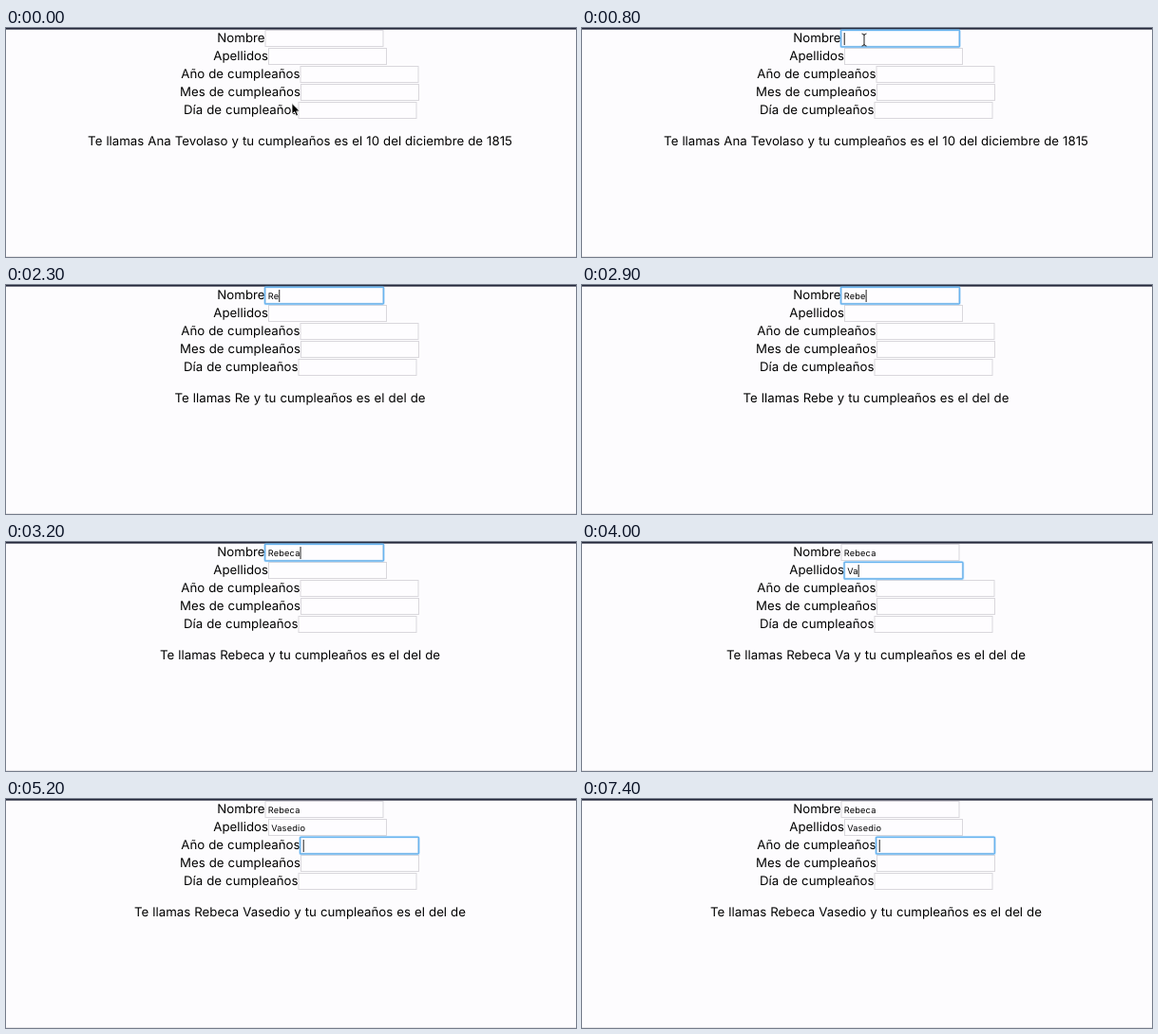
Animation of 600x242 px, one loop 8000 ms. Source, as an HTML page:

```html
<!DOCTYPE html>
<html lang="es">
<head>
<meta charset="utf-8">
<style>
  html, body { margin: 0; width: 100%; height: 100%; overflow: hidden; background: #fdfcfe; }
  svg { display: block; }
  text { font: 13.25px Inter, sans-serif; word-spacing: .3px; fill: #000; text-rendering: geometricPrecision; white-space: pre; }
  .label { text-anchor: end; }
  .value { font-size: 9.2px; letter-spacing: .2px; }
  .box { fill: #fefdff; stroke: #d9d7dc; }
  #ring rect { fill: none; stroke: #69b5f0; }
</style>
</head>
<body>
<svg width="600" height="242" viewBox="0 0 600 242">
  <rect width="600" height="1.6" fill="#23273a"/>
  <rect y="241" width="600" height="1" fill="#e6e5e8"/>
  <g id="form"></g>
  <g id="ring">
    <rect x="-.5" y="-.2" width="125" height="17.7" rx="1" stroke-width="3" stroke-opacity=".2"/>
    <rect x="-.5" y="-.2" width="125" height="17.7" rx="1" stroke-width="1.4"/>
  </g>
  <rect id="caret" width="1" height="13" fill="#222"/>
  <text id="sentence" x="309.5" y="124" text-anchor="middle"></text>
  <path id="arrow" d="M0 0V11.6L2.7 9.1L4.5 13.4L6.5 12.5L4.7 8.4H8.2Z" fill="#000" stroke="#fff" stroke-width=".8"/>
  <path id="beam" d="M-2.5 -6.5Q0 -6.5 0 -4.5Q0 -6.5 2.5 -6.5M0 -4.5V4.5M-2.5 6.5Q0 6.5 0 4.5Q0 6.5 2.5 6.5" fill="none" stroke="#222"/>
</svg>
<script>
const LOOP = 8000;
const $ = id => document.getElementById(id);

const fields = [
  ['Nombre', 272.5], ['Apellidos', 276], ['Año de cumpleaños', 309.5],
  ['Mes de cumpleaños', 310], ['Día de cumpleaños', 307.5]
].map(([label, x], i) => ({ label, x: x + .5, y: 2.5 + 19 * i }));

$('form').innerHTML = fields.map(({ label, x, y }) => `
  <text class="label" x="${x - .5}" y="${y + 12.5}">${label}</text>
  <rect class="box" x="${x}" y="${y}" width="124" height="17"/>
  <text class="value" x="${x + 2.7}" y="${y + 12.7}"></text>`).join('');
const values = document.querySelectorAll('.value');

const typed = [
  { text: 'Rebeca', keys: [2100, 2300, 2500, 2700, 3000, 3200] },
  { text: 'Vasedio', keys: [3800, 4000, 4200, 4400, 4600, 5200, 5200] }
];
const focusTimes = [800, 3400, 5200];
const caretOff = [[1400, 1900], [5700, 6300], [6900, 7400]];
const pointer = [
  [0, 'arrow', 301, 79.5], [100, 'arrow', 300, 56], [200, 'beam', 299, 35],
  [300, 'beam', 300, 24.5], [500, 'beam', 298, 18], [600, 'beam', 297, 12.5],
  [1000, 'arrow', 538, 194], [1100, 'none', 0, 0]
];

const passed = (times, t) => times.filter(time => time <= t).length;
const show = (el, on) => el.setAttribute('visibility', on ? 'visible' : 'hidden');
const move = (el, x, y) => el.setAttribute('transform', `translate(${x} ${y})`);

function draw(t) {
  const [name, surname] = typed.map(({ text, keys }, i) =>
    values[i].textContent = text.slice(0, passed(keys, t)));
  const [who, date] = name
    ? [`${name} ${surname}`.trim(), 'del de']
    : ['Ana Tevolaso', '10 del diciembre de 1815'];
  $('sentence').textContent = `Te llamas ${who} y tu cumpleaños es el ${date}`;

  const focus = passed(focusTimes, t) - 1;
  const field = fields[focus];
  show($('ring'), field);
  show($('caret'), field && !caretOff.some(([from, to]) => t >= from && t < to));
  if (field) {
    move($('ring'), field.x, field.y);
    move($('caret'), field.x + 2.7 + values[focus].getComputedTextLength(), field.y + 2.5);
  }

  const [, shape, x, y] = pointer[passed(pointer.map(p => p[0]), t) - 1];
  for (const id of ['arrow', 'beam']) {
    show($(id), id === shape);
    move($(id), x, y);
  }
}

const start = performance.now();
function tick() {
  draw((performance.now() - start) % LOOP);
  requestAnimationFrame(tick);
}
tick();
</script>
</body>
</html>
```
